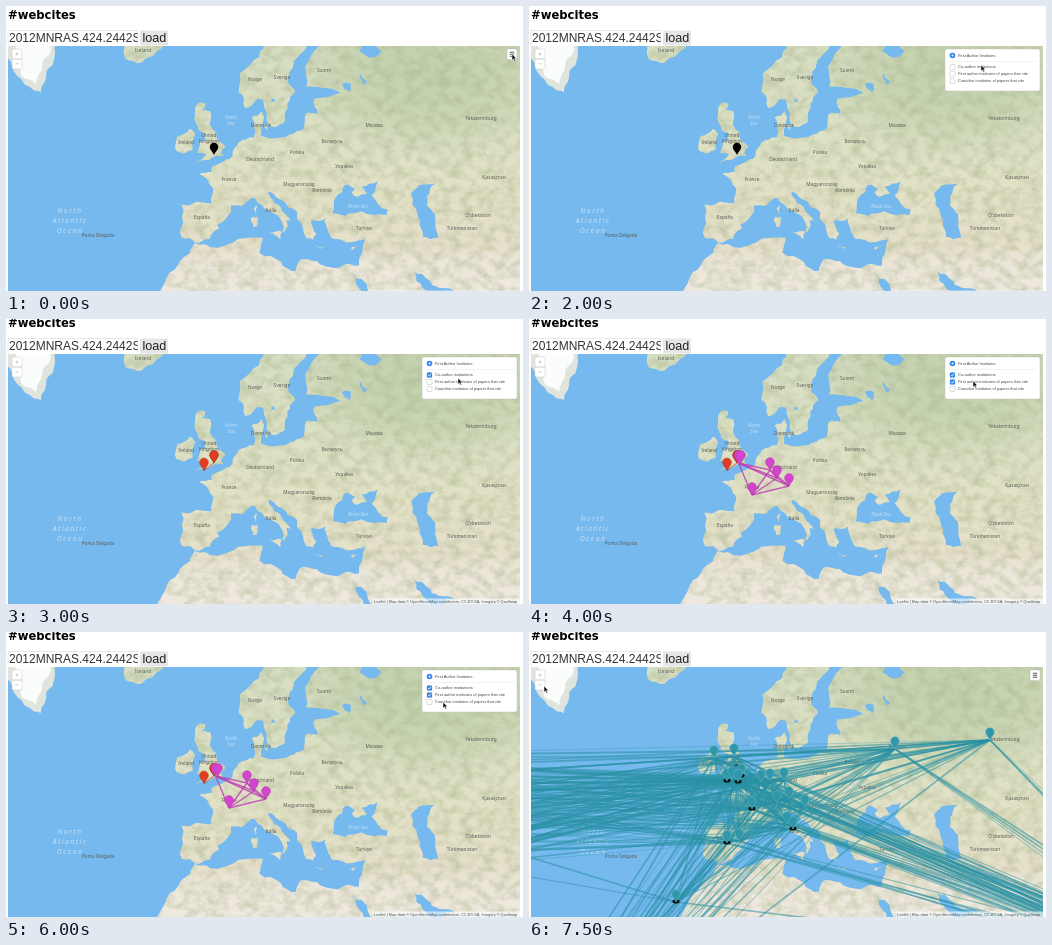
These frames come from a looping animation (517 px wide and 285 px high, 8000 ms). An HTML page:

```html
<!DOCTYPE html>
<html lang="en">
<head>
<meta charset="utf-8">
<title>#webcites</title>
<style>
html, body { margin: 0; width: 100%; height: 100%; overflow: hidden; background: #fff; }
svg { display: block; width: 517px; height: 285px; }
.anim { animation: 8s step-end infinite; }
#page { animation-name: scroll; }
#panel { animation-name: panel; }
#menu { animation-name: menu; }
#bar { animation-name: bar; }
.coauthor { animation-name: coauthor; }
.cite-check { animation-name: citeCheck; }
#citing { animation-name: citing; }
#all { animation-name: all; }
#cursor { animation-name: move; }
#arrow { animation-name: arrow; }
#hand { animation-name: hand; }
@keyframes scroll { 0% { transform: none } 31.25%, 100% { transform: translateY(-5px) } }
@keyframes panel { 0% { opacity: 0 } 18.75% { opacity: 1 } 87.5%, 100% { opacity: 0 } }
@keyframes menu { 0% { opacity: 1 } 18.75% { opacity: 0 } 87.5%, 100% { opacity: 1 } }
@keyframes bar { 0% { opacity: 0 } 31.25% { opacity: 1 } 37.5%, 100% { opacity: 0 } }
@keyframes coauthor { 0% { opacity: 0 } 31.25% { opacity: 1 } 87.5%, 100% { opacity: 0 } }
@keyframes citeCheck { 0% { opacity: 0 } 43.75%, 100% { opacity: 1 } }
@keyframes citing { 0% { opacity: 0 } 50% { opacity: 1 } 87.5%, 100% { opacity: 0 } }
@keyframes all { 0% { opacity: 0 } 87.5%, 100% { opacity: 1 } }
@keyframes arrow { 0% { opacity: 1 } 87.5% { opacity: 0 } 93.75%, 100% { opacity: 1 } }
@keyframes hand { 0% { opacity: 0 } 87.5% { opacity: 1 } 93.75%, 100% { opacity: 0 } }
@keyframes move {
  0% { transform: translate(506px, 48px) }
  25% { transform: translate(452px, 59px) }
  43.75% { transform: translate(444px, 62px) }
  62.5% { transform: translate(437px, 70px) }
  87.5% { transform: translate(116px, 106px) }
  93.75%, 100% { transform: translate(15px, 54px) }
}
text { font-family: "Liberation Sans", Arial, sans-serif; }
#labels text { font: 4.7px "Noto Sans", sans-serif; fill: #5c5e58; text-anchor: middle; }
#labels text.sea { font-style: italic; fill: #c6e0f6; }
#labels text.ocean { font-size: 7px; letter-spacing: 1.4px; }
#panel text { font-size: 4px; fill: #444; }
</style>
</head>
<body>
<svg viewBox="0 0 517 285">
  <defs>
    <linearGradient id="climate" gradientUnits="userSpaceOnUse" x1="0" y1="40" x2="0" y2="290">
      <stop offset="0" stop-color="#d6dec3"/>
      <stop offset=".35" stop-color="#dde1c5"/>
      <stop offset=".6" stop-color="#e2e1c6"/>
      <stop offset=".8" stop-color="#e6e0cb"/>
      <stop offset=".87" stop-color="#ece6da"/>
      <stop offset="1" stop-color="#eee8de"/>
    </linearGradient>
    <radialGradient id="forest" gradientUnits="userSpaceOnUse" cx="425" cy="68" r="150" gradientTransform="translate(0 25) scale(1 .6)">
      <stop offset="0" stop-color="#c0d0ac"/>
      <stop offset=".6" stop-color="#c5d3b0" stop-opacity=".75"/>
      <stop offset="1" stop-color="#cdd8b8" stop-opacity="0"/>
    </radialGradient>
    <filter id="relief" filterUnits="userSpaceOnUse" x="2" y="40" width="512" height="250" color-interpolation-filters="sRGB">
      <feTurbulence type="fractalNoise" baseFrequency=".09 .11" numOctaves="4" seed="7"/>
      <feColorMatrix values="0 0 0 0 .66  0 0 0 0 .7  0 0 0 0 .54  1.1 0 0 0 -.42"/>
      <feComposite in2="SourceAlpha" operator="in"/>
      <feMerge><feMergeNode in="SourceGraphic"/><feMergeNode/></feMerge>
    </filter>
    <clipPath id="frame"><rect x="2" y="40" width="512" height="250"/></clipPath>
    <clipPath id="field"><rect x="2" y="24" width="129.5" height="16"/></clipPath>
  </defs>

  <g id="page" class="anim">
    <text x="2" y="13" style="font:bold 11.6px 'DejaVu Sans',sans-serif">#webcites</text>
    <path d="M2 39V24.5H131.5V39" fill="none" stroke="#d8d8d8" stroke-width=".6"/>
    <text x="3" y="36" font-size="12" fill="#333" clip-path="url(#field)">2012MNRAS.424.2442S</text>
    <rect x="134" y="24.5" width="28" height="15" fill="#e6e6e6"/>
    <text x="136.5" y="36" font-size="12.6" fill="#222">load</text>

    <g clip-path="url(#frame)">
      <rect x="2" y="40" width="512" height="250" fill="#75b9ee"/>
      <g id="land" filter="url(#relief)"></g>
      <g id="seas" fill="#75b9ee"></g>
      <g id="islands" filter="url(#relief)"></g>
      <g id="labels"></g>
      <g id="first"></g>
      <g id="co" class="anim coauthor"></g>
      <g id="citing" class="anim"></g>
      <g id="all" class="anim"></g>

      <rect x="367" y="284.5" width="147" height="6" fill="#fff" opacity=".6"/>
      <text x="368" y="289.2" font-size="3.9" fill="#456">Leaflet | Map data © OpenStreetMap contributors, CC-BY-SA, Imagery © Quellmap</text>
      <rect x="6" y="43" width="10" height="20" rx="1.5" fill="#fff" stroke="#bbb" stroke-width=".4"/>
      <path d="M6 53H16M9.5 48H12.5M11 46.5V49.5M9.5 57.8H12.5" stroke="#aaa" stroke-width=".6"/>
      <g id="menu" class="anim">
        <rect x="501" y="43" width="10" height="10.5" rx="1.5" fill="#fff" stroke="#bbb" stroke-width=".4"/>
        <path d="M503.8 46.2H508.2M503.8 48.2H508.2M503.8 50.2H508.2" stroke="#555" stroke-width="1.1"/>
      </g>
      <g id="panel" class="anim">
        <rect x="416" y="43" width="95" height="42" rx="2" fill="#fff" stroke="#bbb" stroke-width=".4"/>
        <circle cx="423.5" cy="49.5" r="2.8" fill="#2f87e8"/>
        <circle cx="423.5" cy="49.5" r="1" fill="#fff"/>
        <path d="M420 55.5H507" stroke="#e4e4e4" stroke-width=".5"/>
        <text x="429" y="51">First Author Institutes</text>
      </g>
    </g>
  </g>

  <rect id="bar" class="anim" x="513.8" y="7" width="2.4" height="277" rx="1.2" fill="#777"/>
  <g id="cursor" class="anim">
    <path id="arrow" class="anim" d="M0 0V6.2L1.5 4.9L2.6 7.2L3.6 6.7L2.6 4.5H4.5Z" fill="#111" stroke="#fff" stroke-width=".5"/>
    <path id="hand" class="anim" d="M0 2.5L1 2L1 .8L2 .5L3 .5L4 1.2V3.6L3.2 5.5H1.2Z" fill="#fff" stroke="#555" stroke-width=".6"/>
  </g>
</svg>

<script>
const $ = id => document.getElementById(id);
const add = (parent, name, attrs, text) => {
  const node = document.createElementNS($('page').namespaceURI, name);
  for (const key in attrs) node.setAttribute(key, attrs[key]);
  if (text) node.textContent = text;
  return parent.appendChild(node);
};
const times = (count, make) => Array.from({ length: count }, (_, i) => make(i));

let seed = 11;
const random = () => (seed = seed * 16807 % 2147483647) / 2147483647;

// Mercator projection, 4.09 px per degree
const project = pair => {
  const [lon, lat] = pair.split(',').map(Number);
  const north = Math.log(Math.tan(Math.PI / 4 + lat * Math.PI / 360)) * 180 / Math.PI;
  return [212.2 + 4.09 * lon, 394.8 - 4.09 * north];
};

// Midpoint displacement turns a few key points into a ragged coast
const ragged = (points, depth) => depth == 0 ? points : ragged(points.flatMap((a, i) => {
  const b = points[(i + 1) % points.length];
  const dx = b[0] - a[0], dy = b[1] - a[1];
  const shift = (random() - .5) * Math.min(.34, 5 / Math.hypot(dx, dy));
  return [a, [a[0] + dx / 2 - dy * shift, a[1] + dy / 2 + dx * shift]];
}), depth - 1);
const shape = coast => 'M' + ragged(coast.split(' ').map(project), 2)
  .map(point => point.map(v => v.toFixed(1)).join()).join('L') + 'Z';

const mainland = '11,66 10,64 5.2,62.2 5,60 6.6,58 9.6,59.2 11,59 12.8,55.5 14.2,55.5 16.3,56.2 16.9,58.6 ' +
  '18.8,60 17.2,61 18.2,62.8 22,65.6 25,65.3 21.3,63 21.5,60.7 30,59.9 23.5,59.2 24.3,57.2 21.5,57.3 21,55.3 ' +
  '18.6,54.6 14.3,53.9 10.5,54.2 10.6,57.6 8.2,56.8 8.7,54 5,53.3 3.5,51.4 1.6,50.5 -1.5,49.6 -1.6,48.7 ' +
  '-4.7,48.4 -1.2,46 -1.6,43.4 -9,43.2 -9.2,38.7 -8.9,37 -5.6,36 -6.8,34 -9.8,31.5 -13,27.8 -16,24 80,24 80,66';
const mediterranean = '-5.6,36 -2,36.8 .2,38.8 -.3,39.5 3.2,41.9 3.1,43.1 6.3,43.1 8.8,44.4 10.4,43.3 15.6,40.1 ' +
  '15.8,38 17,39.2 16.8,40.4 18.4,40 16,41.7 13.6,43.5 12.3,45.4 13.7,45 15.3,44.1 19.4,41.8 19.4,40.4 21.5,37 ' +
  '23.2,36.6 24,37.7 22.8,40.4 26.2,40.7 26.8,38.5 28,36.8 32.5,36.1 36,36.8 34.4,31.4 30.5,31.4 25,31.6 ' +
  '20.5,32.7 19,30.3 15.3,32.2 10.1,34 10.9,37 5,36.8 -2,35.1 -5.3,35.8';
const blackSea = '28,41.6 28.8,44.5 31,46.6 33.5,46 32.6,45.4 33.8,44.5 36.5,45.2 35,46.3 39,47.2 37.5,44.8 ' +
  '41.5,42.3 41.2,41.3 35,42 31,41.1';
const caspian = '47.2,45.2 49,46.5 53,46.8 51,44.6 51,43 53,41.5 53.8,37 50,37.2 49.4,40.2 47.6,43';
const persianGulf = '48,30 51,28.5 54,26.6 58,25.5 56,26 54,24 51.5,25 50,26.5';
const redSea = '32.5,29.9 34,27 36,24 39,24 35,28.5';
const whiteSea = '34.5,64.6 38,64 40,64.6 36,66';
const lakes = ['30.3,61 32,60 32.5,61', '34.5,62.2 35.5,61 36.4,61.2', '12.5,58.6 14,58.8 13.2,59.3'];
const britain = '-5.7,50.1 1.3,51.2 .6,51.6 1.7,52.6 .2,53.4 -2,55.8 -2,57.6 -4,57.7 -3.1,58.6 -5,58.6 -5.8,56.5 ' +
  '-4.8,55 -3.1,54.6 -3,53.5 -4.5,53.3 -5.2,51.8 -3,51.4';
const ireland = '-6.2,52.2 -5.6,54.5 -7,55.2 -10,54.2 -10.2,52 -8.5,51.6';
const iceland = '-22.7,63.8 -18.8,63.4 -13.6,65 -14.6,66.3 -24,66.3';
const sicily = '12.5,38 15.6,38.2 15.1,36.7', sardinia = '8.2,40.9 9.6,41 9.4,39.1 8.5,39';
const corsica = '8.6,42.4 9.4,43 9.2,41.5', crete = '23.6,35.5 26.2,35.2 24.8,34.9';
const cyprus = '32.4,34.9 34.5,35.6 33,34.6', zealand = '11.1,55.7 12.5,56 12,55';
const greenland = '-55,66 -50,62.5 -46,60.6 -43.4,60 -42,62.5 -40,64 -39.5,66';
const icecap = '-51,66 -48.2,62 -44.5,61 -43,63 -41,64.6 -41,66';

const landPath = shape(mainland);
for (const fill of ['climate', 'forest']) add($('land'), 'path', { d: landPath, fill: `url(#${fill})` });
add($('seas'), 'path', { d: [mediterranean, blackSea, caspian, persianGulf, redSea, whiteSea, ...lakes].map(shape).join('') });
add($('seas'), 'path', { d: shape(greenland), fill: '#dfe5dc' });
add($('seas'), 'path', { d: shape(icecap), fill: '#fbfcfc' });
add($('islands'), 'path', {
  d: [britain, ireland, iceland, sicily, sardinia, corsica, crete, cyprus, zealand].map(shape).join(''),
  fill: 'url(#climate)'
});

const label = (text, x, y, kind = '') => add($('labels'), 'text', { x, y, class: kind }, text);
[['Iceland', 137, 46], ['Norge', 249, 75], ['Sverige', 276, 73], ['Suomi', 318, 66], ['United', 203, 131],
 ['Kingdom', 203, 136.5], ['Ireland', 180, 138], ['Danmark', 255, 121], ['Deutschland', 254, 155],
 ['Polska', 291, 148], ['Беларусь', 326, 137], ['Україна', 338, 162], ['France', 223, 175], ['España', 196, 213],
 ['Italia', 265, 206], ['Magyarország', 293, 180], ['România', 316, 186], ['Türkiye', 358, 224], ['Москва', 368, 121],
 ['Yekaterinburg', 475, 114], ['Қазақстан', 488, 173], ['Oʻzbekiston', 472, 211], ['Türkmenistan', 456, 224],
 ['Ponta Delgada', 92, 231]
].forEach(entry => label(...entry));
['North', 'Atlantic', 'Ocean'].forEach((word, i) => label(word, 64, 207 + 10 * i, 'sea ocean'));
['North', 'Sea'].forEach((word, i) => label(word, 225, 113 + 6 * i, 'sea'));
label('Black Sea', 352, 202, 'sea');

// A pin is placed by its tip
const pin = (layer, [x, y], fill, stroke = 'none') => add(layer, 'path', {
  d: `M${x} ${y}c-1-3-4.3-5-4.3-8a4.3 4.3 0 0 1 8.6 0c0 3-3.3 5-4.3 8Z`, fill, stroke, 'stroke-width': .6
});
const link = (layer, from, to, stroke, width, opacity) =>
  add(layer, 'path', { d: `M${from}L${to}`, stroke, 'stroke-width': width, opacity });
const linkPairs = (points, draw) => points.forEach((from, i) => points.slice(i + 1).forEach(to => draw(from, to)));

const home = [208, 149], neighbour = [198, 156.5];
pin($('first'), home, '#000');
link($('co'), home, neighbour, '#d84030', 1, .8);
for (const tip of [neighbour, home]) pin($('co'), tip, '#e23d20', '#b53018');

const citing = [[209.5, 149], [241, 156], [248, 164], [260, 172], [223, 181]];
linkPairs(citing, (from, to) => link($('citing'), from, to, '#bd3cb4', 1.4, .8));
for (const tip of [...citing, [212, 149]]) pin($('citing'), tip, '#d444cf', '#b534b0');

const britishHubs = [[185, 131], [205, 129], [198, 154], [203, 152], [212, 149], [209, 155]];
const continentalHubs = [[232, 155], [241, 154], [255, 153], [248, 176], [260, 172], [276, 180], [258, 197],
  [264, 202], [223, 182], [198, 216], [210, 214]];
const hubs = [...britishHubs, ...continentalHubs];
const east = [[366, 122], [461, 113]];
const tenerife = [147, 275];
const west = times(9, i => [-280 + 22 * i, 130 + 14 * i]);
const south = times(3, i => [-74 + 30 * i, 524]);
const southEast = times(4, i => [705, 342 + 9 * i]);
const tealLink = (from, to) => link($('all'), from, to, '#2a91a4', .5 + 1.5 * random(), .55);

for (const from of [...hubs, ...east])
  for (const to of [...west, ...south, ...southEast, tenerife]) if (random() < .8) tealLink(from, to);
linkPairs([...hubs, ...east], tealLink);
for (const to of [west[2], west[7], south[0], southEast[0]]) tealLink(tenerife, to);

for (const [cx, cy] of [hubs[2], hubs[5], hubs[4], hubs[14], hubs[15], hubs[13], tenerife])
  add($('all'), 'ellipse', { cx, cy: cy - .5, rx: 3.6, ry: 2, fill: '#071518' });
for (const tip of [...hubs, tenerife, ...east]) pin($('all'), tip, '#2f97a9', '#5db4c1');

['Co-author institutions', 'First author institutes of papers that cite', 'Coauthor institutes of papers that cite']
  .forEach((name, i) => {
    const y = 61 + 7 * i;
    const box = { x: 421, y: y - 2.5, width: 5, height: 5, rx: .8 };
    add($('panel'), 'rect', { ...box, fill: '#fff', stroke: '#bbb', 'stroke-width': .5 });
    add($('panel'), 'text', { x: 429, y: y + 1.4 }, name);
    if (i == 2) return;
    const check = add($('panel'), 'g', { class: 'anim ' + ['coauthor', 'cite-check'][i] });
    add(check, 'rect', { ...box, fill: '#2f87e8' });
    add(check, 'path', { d: `M422.2 ${y}l1 1.2l1.8-2.5`, fill: 'none', stroke: '#fff', 'stroke-width': .8 });
  });
</script>
</body>
</html>
```
